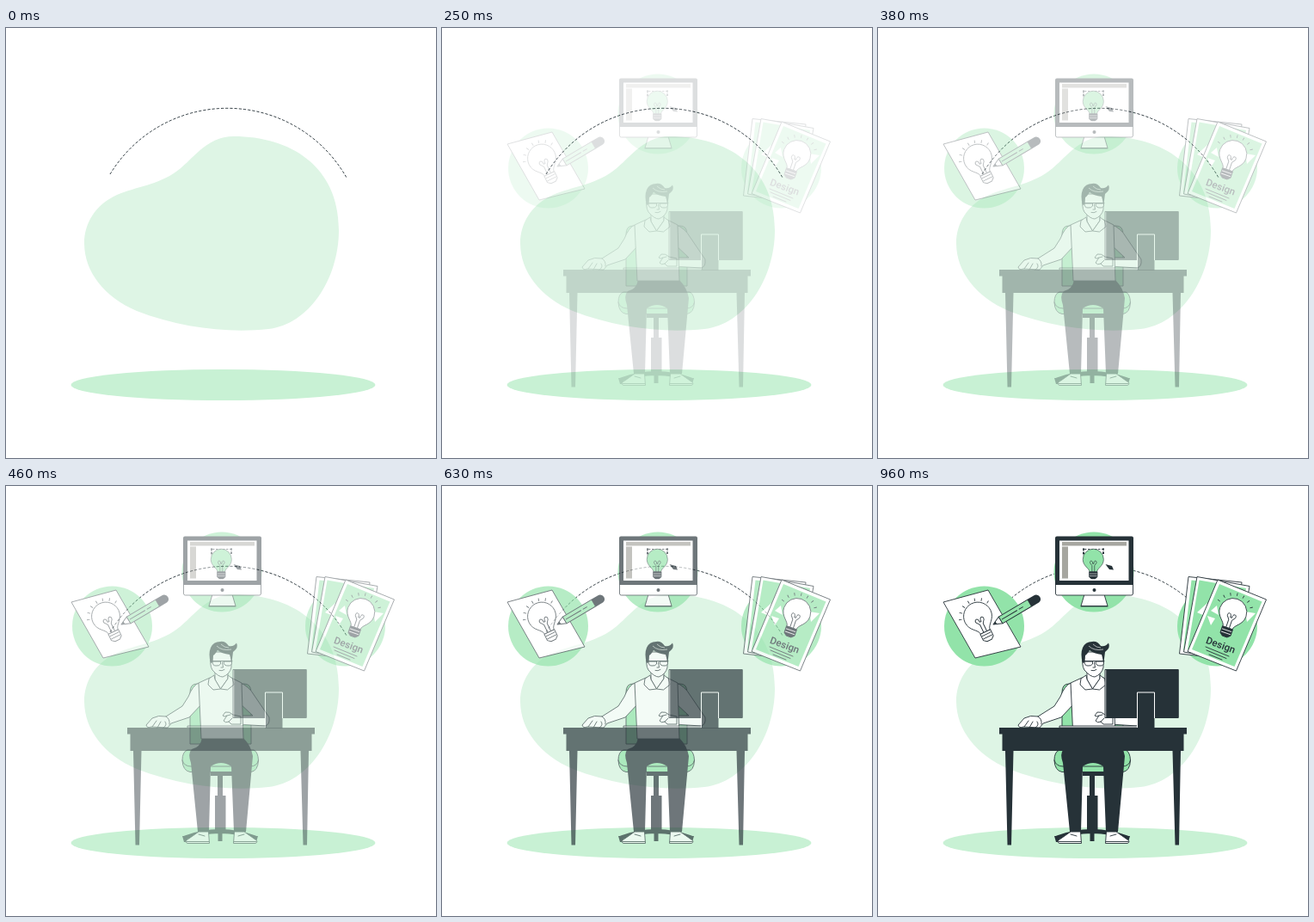
These frames come from a looping animation (500x500 px, 1 s). An HTML page:

```html
<!DOCTYPE html>
<html lang="en">
<head>
<meta charset="utf-8">
<title>Designer at work</title>
<style>
  html, body { margin: 0; width: 100%; height: 100%; overflow: hidden; background: #fff; }
  svg { display: block; width: 100vw; height: 100vh; }
  .fade { opacity: 0; }
  .ln { fill: none; stroke: #263238; stroke-width: .9; stroke-linecap: round; stroke-linejoin: round; }
  .w { fill: #fff; stroke: #263238; stroke-width: .9; stroke-linejoin: round; }
  .g { fill: #92e3a9; stroke: #263238; stroke-width: .9; stroke-linejoin: round; }
  .d { fill: #263238; }
  .c { fill: #92e3a9; }
  .grey { fill: #a6a6a0; }
  .ray { fill: none; stroke: #263238; stroke-width: 3.500; stroke-dasharray: .8 7; }
  .title { font: 500 11.500px Roboto, "Open Sans", sans-serif; font-stretch: 75%; fill: #263238; }
</style>
</head>
<body>
<svg viewBox="0 0 500 500" xmlns="http://www.w3.org/2000/svg">
  <defs>
    <g id="bulb">
      <path d="M-6 19C-6 13-16.500 10-16.500-1A16.500 16.500 0 1 1 16.500-1C16.500 10 6 13 6 19Z"
            style="fill:var(--glass)" stroke="#263238" stroke-width=".8"/>
      <path class="ln" d="M-2 19V9L-5 5C-6 1-2 0-1 4V6H1V4C2 0 6 1 5 5L2 9V19"/>
      <path d="M-6.500 19H6.500V27L3 30H-3L-6.500 27Z" style="fill:var(--base)" stroke="#263238" stroke-width=".9"/>
      <path d="M-6 22H6M-6 25.500H6" stroke="var(--thread)" stroke-width=".8"/>
    </g>
  </defs>

  <path fill="#def5e5" d="M265 126C330 126 387 160 387 235C387 292 352 345 305 350C260 355 203 349 152 329C115 313 91 284 91 250C91 227 104 207 125 196C147 185 172 184 195 169C217 155 231 126 265 126Z"/>
  <ellipse cx="252.500" cy="415" rx="177" ry="18" fill="#c8f1d4"/>
  <path d="M121 170A159.500 159.500 0 0 1 396 174" fill="none" stroke="#263238" stroke-width=".95" stroke-dasharray="3.200 2"/>

  <!-- sketch -->
  <g class="fade">
    <circle class="c" cx="123.500" cy="163" r="46.500"/>
    <path class="w" d="M76 135L128 121L166 187L113 200Z"/>
    <g transform="translate(116.500 152.500) rotate(-26)" style="--glass:#fff;--base:#fff;--thread:#263238">
      <use href="#bulb"/>
      <path class="ray" d="M-20-6A21 21 0 0 1 20-6"/>
    </g>
    <g transform="translate(134 161) rotate(-30.500)">
      <path class="w" d="M0 0L10-4.500V4.500Z"/>
      <path class="d" d="M0 0L4-1.800V1.800Z"/>
      <path class="g" d="M10-4.500H49V4.500H10Z"/>
      <path class="ln" d="M12 0H32M35 0H40"/>
      <path class="d" d="M49-5H59Q63-4 63 0T59 5H49Z"/>
    </g>
  </g>

  <!-- screen -->
  <g class="fade">
    <circle class="c" cx="251" cy="100" r="46.500"/>
    <path class="w" d="M240 126H263L267 139.500H236Z"/>
    <path class="ln" d="M236 140H267"/>
    <rect class="w" x="206.500" y="60" width="90" height="67" rx="2"/>
    <path class="d" d="M208 58.500H295Q297 58.500 297 60.500V115H206V60.500Q206 58.500 208 58.500Z"/>
    <rect x="211" y="63.500" width="80.500" height="46.500" fill="#fff"/>
    <path class="grey" d="M214 65H289V69.500H214ZM214 70.500H221V107.500H214Z"/>
    <circle class="d" cx="251.500" cy="121" r="2"/>
    <path class="ln" d="M239 80V73.500H262V80" stroke-dasharray="1.500 2.500"/>
    <use href="#bulb" transform="translate(250.300 86) scale(.73)" style="--glass:#92e3a9;--base:#263238;--thread:#fff"/>
    <path class="d" d="M238 72.500h2v2h-2zM261 72.500h2v2h-2zM238 77h2v2h-2zM261 77h2v2h-2zM264.500 91L272 93L274 97.500L269 97Z"/>
  </g>

  <!-- poster -->
  <g class="fade">
    <circle class="c" cx="394.500" cy="163" r="46.500"/>
    <path class="w" d="M361 105.500L423 112L413 202L350.500 195Z"/>
    <path class="c" d="M364.500 109.500L419 115L410 198L355 191Z"/>
    <path class="w" d="M371 105.500L432 116.500L417 204L355.500 193Z"/>
    <path class="c" d="M373.500 109.500L428 119L414 200L360 190Z"/>
    <path fill="#fff" d="M383 136L371 147L380 151Z"/>
    <path class="w" d="M395 109L451.500 132L416.500 215L360 192.500Z"/>
    <path class="c" d="M397 114L446.500 134.500L414.500 210L365 190Z"/>
    <path fill="#fff" d="M383 151L392 154L387 162ZM387 145L394 139L396 150ZM427 146L439 148L429 158Z"/>
    <g transform="translate(412.500 147.500) rotate(19)" style="--glass:#fff;--base:#263238;--thread:#fff">
      <use href="#bulb" transform="scale(.97)"/>
      <path class="ray" d="M-20-8A22 22 0 0 1 21-8"/>
    </g>
    <text class="title" transform="translate(380.500 182.500) rotate(20)">Design</text>
    <path class="ln" d="M381 187L408 198M382 191L405 200.500M385 196L400 202"/>
  </g>

  <!-- chair and designer -->
  <g class="fade">
    <path class="g" d="M222 230H277Q285 230 285 240V300H214V240Q214 230 222 230Z"/>
    <path class="g" d="M211 307H288Q293 309 293.500 319Q293 331 285 332.500H214Q205.500 331 205 319Q205 309 211 307Z"/>
    <path class="ln" d="M205 319Q207 326 215 326H284Q292 326 293.500 319"/>
    <path class="d" d="M238 332H263V337H252V360H255.500V400H243V360H246V337H238Z"/>
    <path d="M208 409Q228 401.500 249 401.500T290 409M249 400V413" fill="none" stroke="#263238" stroke-width="5"/>
    <path class="d" d="M205 407H211V414H207ZM287 407H293L291 414H287Z"/>

    <path class="w" d="M210.500 411.500Q217 407 224 402H235.500L236.500 415.500H211Q207.500 414 210.500 411.500Z"/>
    <path class="w" d="M290.500 411.500Q284 407 277 402H265.500L264.500 415.500H290Q293.500 414 290.500 411.500Z"/>
    <path class="ln" d="M210 413.500H236M265 413.500H291M224 405L231 407M277 405L270 407"/>
    <path class="d" d="M228 293H276Q285 302 287 314L279 402H265L262 326Q250 318 238 326L236 402H223L215 322Q211 311 216 306Q226 304 228 293Z"/>

    <path class="w" d="M224 229Q217 232 212 245L205 256L186 268Q177 266 170 270L163 278Q164 282 169 280L188 281L192 276L213 269L229 252Z"/>
    <path class="ln" d="M186 268Q191 271 190 277M170 280L175 273M176 281L180 274M183 281Q188 278 185 274"/>
    <path class="w" d="M272 229Q282 232 289 244L306 269Q307 278 301 279L270 277L270 267H287L270 251Z"/>
    <path class="w" d="M237 223L224 229L227 294H276L274 229L262 223Z"/>
    <path class="w" d="M243 214V225L249.500 236L258 224V214Z"/>
    <path class="w" d="M242 220L236 224L235 231L241 237L249.500 236L243 225ZM258 220L263.500 224L265 231L257.500 237L249.500 236L258 224Z"/>
    <path class="w" d="M239 193H262V211Q260 219 252 222Q247 222 240 214Q236 208 239 193Z"/>
    <path class="d" d="M238 206Q235 195 238 188Q241 181 249 181Q255 180 259 186Q265 187 268 182.500Q271 188 264 193L262.500 205L260 196Q251 195 246 191Q243 196 241 197L240.500 205Z"/>
    <path d="M245 186Q251 192 262 190M250 184Q254 188 259 188" fill="none" stroke="#fff" stroke-width=".6"/>
    <path class="w" d="M240 204H249.500V207Q248 209.500 244 209Q240 209 240 204ZM253 204H262.500Q263 209 259 209Q253 209.500 253 204Z"/>
    <path class="ln" d="M237.500 203.500H263M251.500 205L252.500 211H250M248 214.500Q251 215.500 254 213.500"/>
    <path class="w" d="M273 268L264 266Q260 262 255 263L252 267Q254 269 257 267L253 273Q255 276 259 274L262 277H273Z"/>
    <path class="ln" d="M257 267L261 266M259 274L263 270"/>
  </g>

  <!-- desk -->
  <g class="fade">
    <path class="w" d="M211 279H302V281H211Z"/>
    <path class="d" d="M141 281H359V288.500H355.500V308H352L350 417.500H345.500L342.500 308H157.500L155 417.500H150.500L148 308H144.500V288.500H141Z"/>
  </g>

  <!-- monitor -->
  <g class="fade">
    <rect class="d" x="263.500" y="213" width="86.300" height="57" rx="1"/>
    <path d="M264.800 214V269" stroke="#fff" stroke-width=".7"/>
    <path class="d" d="M301.500 240H321.500V281.500H301.500Z"/>
    <path d="M301.500 281V240H321.500V270" fill="none" stroke="#fff" stroke-width="1"/>
  </g>
</svg>
<script>
  const LOOP = 1000, FPS = 24, HOLD = 3, TICK = 10;

  // nearly linear, softening towards the end
  const ease = u => u + 0.45 * u * u * (1 - u);

  // hold, then fade in on a 24 fps grid
  const steps = Array.from({ length: FPS }, (_, n) => ({
    offset: Math.round(n * LOOP / FPS / TICK) * TICK / LOOP,
    opacity: ease(Math.max(0, (n - HOLD) / (FPS - 1 - HOLD))),
    easing: "step-end"
  }));
  steps.push({ offset: 1, opacity: 1 });

  for (const el of document.querySelectorAll(".fade")) {
    el.animate(steps, { duration: LOOP, iterations: Infinity }).startTime = 0;
  }
</script>
</body>
</html>
```
